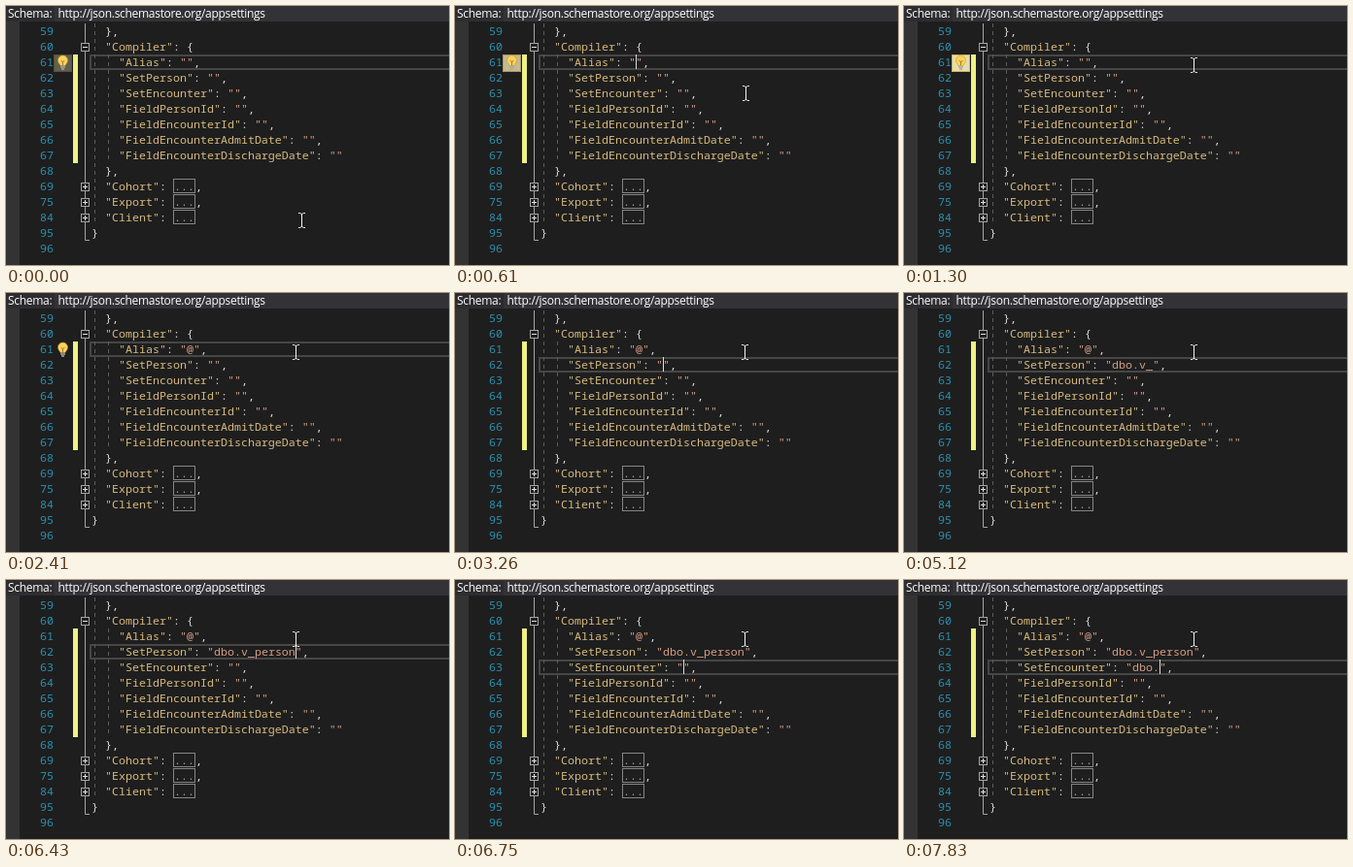
Animation of 456 by 267 pixels, one loop 8 s. Source, as an HTML page:

```html
<!DOCTYPE html>
<html lang="en">
<head>
<meta charset="utf-8">
<title>Settings editor</title>
<style>
html, body { margin: 0; width: 100%; height: 100%; overflow: hidden; background: #1e1e1e; }
svg { display: block; width: 456px; height: 267px; }
text { white-space: pre; }
.code text { font: 11.667px "Noto Sans Mono", "DejaVu Sans Mono", monospace; fill: #dcdcdc; }
.code .num { fill: #2b91af; }
.code .dots { fill: #a5a5a5; }
.key { fill: #d7ba7d; }
.str { fill: #d69d85; }
.bar text { font: 12px "Open Sans", "Noto Sans", sans-serif; letter-spacing: -.3px; fill: #fff; }
.guide { stroke: #5c5c5c; stroke-dasharray: 4 4; }
.fold { stroke: #a5a5a5; fill: none; }
.closed { stroke: #858585; fill: none; }
.toggle { stroke: #a5a5a5; fill: #1e1e1e; }
.sign { stroke: #e0e0e0; }
</style>
</head>
<body>
<svg id="stage" viewBox="0 0 456 267">
  <rect width="456" height="267" fill="#1e1e1e"/>
  <rect y="16" width="14" height="251" fill="#333"/>
  <g class="bar">
    <rect width="456" height="16" fill="#2d2d30"/>
    <rect x="50" width="406" height="16" fill="#333337"/>
    <text x="2" y="12">Schema:</text>
    <text x="53.5" y="12">http://json.schemastore.org/appsettings</text>
  </g>
  <rect x="69" y="50" width="5" height="112" fill="#eff284"/>
  <rect id="current" x="87" width="380" height="14" fill="none" stroke="#464646" stroke-width="2"/>
  <path class="guide" d="M91.5 18V226M105.5 50V162"/>
  <path class="fold" d="M81.5 18V241.5H86"/>
  <g id="folds"></g>
  <g id="code" class="code"></g>
  <rect id="caret" width="1" height="15" fill="#dcdcdc"/>
  <g id="bulb">
    <rect id="glow" x="49.5" y=".5" width="18" height="17" fill="#fdf4bf" stroke="#e5c365"/>
    <path d="M56 11.5C55.8 10 53.5 9 53.5 6A5 5 0 0 1 63.5 6C63.5 9 61.2 10 61 11.5Z" fill="#ffd35c" stroke="#c8922e" stroke-width=".6"/>
    <path d="M56.8 6L58.5 8L60.2 6M58.5 8V11" fill="none" stroke="#8a651d" stroke-width=".8"/>
    <path d="M56 13H61M57 15H60" stroke="#a8a8a8" stroke-width="1.3"/>
  </g>
  <path id="mouse" fill="none" stroke="#f4f4f4" d="M-3 -8H-1.5L.5 -7L2.5 -8H4M.5 -7V6M-3 7H-1.5L.5 6L2.5 7H4"/>
</svg>
<script>
const LOOP = 8000, LEFT = 88, TOP = 18, CELL = 7, ROW = 16;
const $ = id => document.getElementById(id);
const rowTop = row => TOP + row * ROW;
const colX = col => LEFT + col * CELL;

function add(parent, tag, attrs, text = '') {
  const el = document.createElementNS('http://www.w3.org/2000/svg', tag);
  for (const name in attrs) el.setAttribute(name, attrs[name]);
  el.textContent = text;
  return parent.appendChild(el);
}

// [number, indent, key or bracket, kind, tail]
const lines = [
  [59, 2, '},'], [60, 2, 'Compiler', 'open'],
  [61, 4, 'Alias', 'value'], [62, 4, 'SetPerson', 'value'],
  [63, 4, 'SetEncounter', 'value'], [64, 4, 'FieldPersonId', 'value'],
  [65, 4, 'FieldEncounterId', 'value'], [66, 4, 'FieldEncounterAdmitDate', 'value'],
  [67, 4, 'FieldEncounterDischargeDate', 'last'], [68, 2, '},'],
  [69, 2, 'Cohort', 'folded', ','], [75, 2, 'Export', 'folded', ','],
  [84, 2, 'Client', 'folded', ''], [95, 0, '}'], [96, 0, '']
];
const values = [];

function foldBox(row, closed) {
  const y = rowTop(row) + 4.5;
  add($('folds'), 'rect', { class: 'toggle', x: 77.5, y, width: 8, height: 8 });
  add($('folds'), 'path', { class: 'sign', d: `M79 ${y + 4}h5` + (closed ? `M81.5 ${y + 1.5}v5` : '') });
}

lines.forEach(([num, indent, word, kind, tail], row) => {
  const y = rowTop(row) + 12, code = $('code');
  add(code, 'text', { class: 'num', x: 35, y }, num);
  const line = add(code, 'text', { x: colX(indent), y }, kind ? '' : word);
  if (!kind) return;
  add(line, 'tspan', { class: 'key' }, `"${word}"`);
  add(line, 'tspan', {}, kind === 'open' ? ': {' : ': ');
  if (kind === 'value' || kind === 'last') {
    values[row] = add(line, 'tspan', { class: 'str' }, '""');
    if (kind === 'value') add(line, 'tspan', {}, ',');
  } else {
    foldBox(row, kind === 'folded');
  }
  if (kind === 'folded') {
    const x = colX(indent + word.length + 4);
    add(code, 'rect', { class: 'closed', x: x + .5, y: y - 11.5, width: 22, height: 14 });
    add(code, 'text', { class: 'dots', x: x + 1, y }, '...');
    add(code, 'text', { x: x + 23, y }, tail);
  }
});

// Either [time, row, column] to move the caret or [time, text] to type
const actions = [
  [0, 2, 14], [1940, '@'],
  [2640, 3, 15], [2710, 3, 20], [2940, 3, 19], [3260, 3, 18],
  [4120, 'd'], [4270, 'bo'], [4590, '.'], [4830, 'v'], [5120, '_'], [5350, 'p'],
  [5750, 'e'], [5820, 'r'], [5900, 's'], [6120, 'on'],
  [6510, 4, 23], [6580, 4, 22], [6750, 4, 21],
  [7360, 'd'], [7530, 'b'], [7600, 'o'], [7830, '.']
];
const caretOn = [[570, 1100], [1630, 2160], [2700, 3810], [4360, 4890], [5430, 5970], [6430, 7290], [7820, LOOP]];
const bulbOn = [[0, 1940], [2410, 2640], [3810, 4120], [7290, 7360]];

const within = (spans, t) => spans.some(([from, to]) => t >= from && t < to);
const ramp = (t, from, to) => Math.min(1, Math.max(0, (t - from) / (to - from)));
const show = (el, on) => el.setAttribute('visibility', on ? 'visible' : 'hidden');

function draw(t) {
  let row = 2, col = 14;
  const typed = { 2: '', 3: '', 4: '' };
  for (const [time, what, to] of actions) {
    if (time > t) break;
    if (typeof what === 'string') {
      typed[row] += what;
      col += what.length;
    } else {
      row = what;
      col = to;
    }
  }
  for (const r in typed) {
    const text = `"${typed[r]}"`;
    if (values[r].textContent !== text) values[r].textContent = text;
  }

  $('current').setAttribute('y', rowTop(row) + 1);
  $('caret').setAttribute('x', colX(col));
  $('caret').setAttribute('y', rowTop(row));
  show($('caret'), within(caretOn, t));

  $('bulb').setAttribute('transform', `translate(0 ${rowTop(row)})`);
  show($('bulb'), within(bulbOn, t));
  $('glow').setAttribute('opacity', (.3 + .6 * ramp(t, 0, 840)) * (1 - ramp(t, 1300, 1770)));

  // The pointer is sampled about every 77 ms
  const step = t < 70 ? 0 : Math.min(11, Math.floor((t - 70) / 77) + 1) / 11;
  const ease = step * step * (3 - 2 * step);
  const x = Math.round(304 - 6 * ease), y = Math.round(221 - 160 * ease);
  $('mouse').setAttribute('transform', `translate(${x} ${y + .5})`);
}

const start = performance.now();
function tick() {
  draw((performance.now() - start) % LOOP);
  requestAnimationFrame(tick);
}
tick();
</script>
</body>
</html>
```
